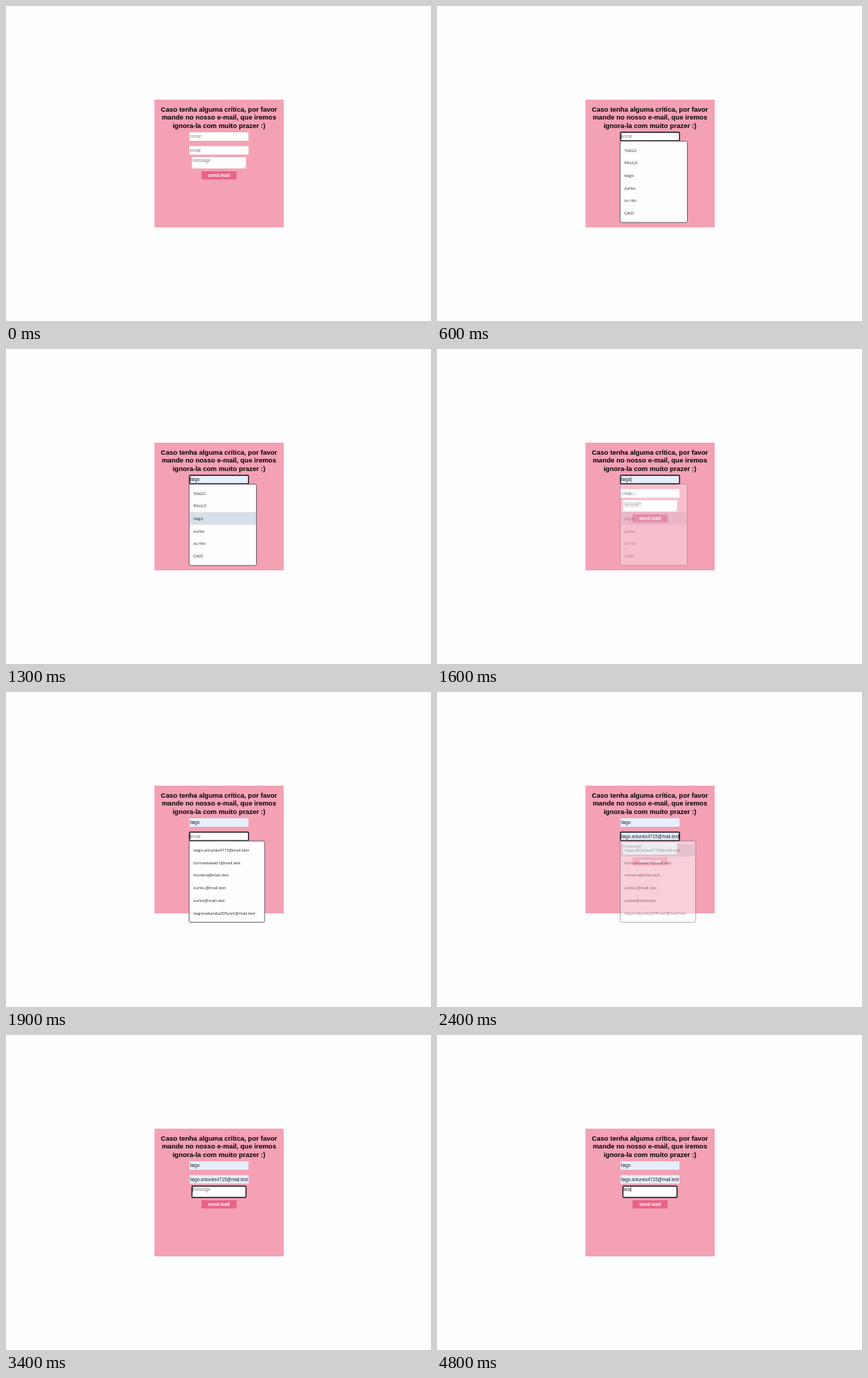
Animation of 600 by 444 pixels, one loop 5 s. Source, as an HTML page:

```html
<!DOCTYPE html>
<html lang="pt">
<head>
<meta charset="utf-8">
<style>
  html, body { margin: 0; width: 100%; height: 100%; overflow: hidden; background: #fefdff; }
  svg { display: block; }
  text { font: 6.3px "Liberation Sans", Arial, sans-serif; fill: #222; white-space: pre; }
  .title { font-size: 9.5px; font-weight: bold; text-anchor: middle; fill: #000; }
  .hint { fill: #808080; }
  .button { font-size: 6.7px; font-weight: bold; text-anchor: middle; fill: #fff; }
  .option { font: 5.8px "Open Sans", sans-serif; fill: #222; }
</style>
</head>
<body>
<svg id="stage" width="600" height="444" viewBox="0 0 600 444"></svg>
<script>
const LOOP = 5000, STEP = 100, ROW = 17.7;
const TITLE = ["Caso tenha alguma crítica, por favor", "mande no nosso e-mail, que iremos", "ignora-la com muito prazer :)"];
const NAMES = ["TIAGO", "PAULO", "tiago", "zurbo", "zu rbo", "CAIO"];
const EMAILS = ["tiago.antunes4715", "turmadoweb1", "moreira", "zurbo.", "zurbo", "tiagonabanda205som"]
  .map(user => user + "@mail.test");
const stage = document.getElementById("stage");

const rect = (x, y, w, h, fill, extra = "") =>
  `<rect x="${x}" y="${y}" width="${w}" height="${h}" fill="${fill}" ${extra}/>`;
const text = (x, y, str, cls = "") => `<text x="${x}" y="${y}" class="${cls}">${str}</text>`;
const between = (t, from, to) => t >= from && t < to;
const fade = (t, start, length) => Math.max(0, Math.min(1, 1 - (t - start + STEP) / length));

function field({ x, y, w, h, hint, value, filled, focused, caret }) {
  const base = y + (h > 14 ? 6.9 : 8.4);
  return rect(x, y, w, h, filled ? "#e6eefc" : "#fff") +
    (value ? text(x + .7, base, value) : text(x + .7, base, hint, "hint")) +
    (caret ? rect(caret, base - 5.8, .6, 7, "#000") : "") +
    (focused ? rect(x, y, w, h, "none", 'rx="1.2" stroke="#101018" stroke-width="1.4"') : "");
}

function dropdown(y, w, options, active, opacity) {
  const rows = options.map((option, i) => {
    const top = y + 4.1 + i * ROW;
    return (i === active ? rect(258.9, top, w - .8, ROW, "#d7dfe8") : "") +
      text(264.6, top + 10.9, option, "option");
  });
  return `<g opacity="${opacity}">` +
    rect(258.5, y, w, 114.6, "#fefdff", 'rx="2" stroke="#55505a" stroke-width=".9"') +
    rows.join("") + "</g>";
}

function draw(t) {
  const nameRow = between(t, 1000, 1700) ? Math.max(2, 5 - (t - 1000) / STEP) : -1;
  const nameFilled = t >= 1000;
  const emailFilled = t >= 2100;
  const message = t < 4300 ? "" : t < 4600 ? "t" : t < 4800 ? "tes" : "test";
  const messageEnd = { "": 262.9, t: 264.9, tes: 271.6, test: 273.6 }[message];

  let svg = rect(209.5, 132, 182.5, 180, "#f4a1b4");
  TITLE.forEach((line, i) => svg += text(300.7, 149 + i * 11.3, line, "title"));

  svg += field({
    x: 259, y: 178, w: 83.4, h: 12, hint: "nome",
    value: nameFilled && NAMES[t < 1300 ? nameRow : 2],
    filled: nameFilled,
    focused: between(t, 600, 1900),
    caret: between(t, 600, 1500) ? 259.8 : between(t, 1500, 1900) ? 273.6 : 0
  });
  svg += field({
    x: 259, y: 197.5, w: 83.4, h: 12, hint: "email",
    value: emailFilled && EMAILS[0],
    filled: emailFilled,
    focused: between(t, 1900, 3000),
    caret: between(t, 1900, 2300) ? 259.8 : between(t, 2300, 2700) ? 341.4 : 0
  });
  svg += field({
    x: 262.5, y: 213, w: 76.4, h: 16, hint: "message",
    value: message,
    focused: t >= 3400,
    caret: t >= 3400 && !between(t, 4000, 4300) ? messageEnd : 0
  });
  svg += '<path d="M335.6 228.4l2.8-2.8m-1.2 2.8l1.2-1.2" stroke="#777" stroke-width=".5"/>';
  svg += rect(276, 233, 49.6, 11.5, "#e86486") + text(300.8, 241.2, "send mail", "button");

  if (between(t, 600, 1700)) svg += dropdown(190.5, 95, NAMES, nameRow, fade(t, 1500, 300));
  if (between(t, 1900, 2600)) svg += dropdown(210, 106.6, EMAILS, t >= 2000 ? 0 : -1, fade(t, 2300, 400));
  stage.innerHTML = svg;
}

let shown = -1;
function tick() {
  const t = Math.floor(performance.now() % LOOP / STEP) * STEP;
  if (t !== shown) draw(shown = t);
  requestAnimationFrame(tick);
}
tick();
</script>
</body>
</html>
```
